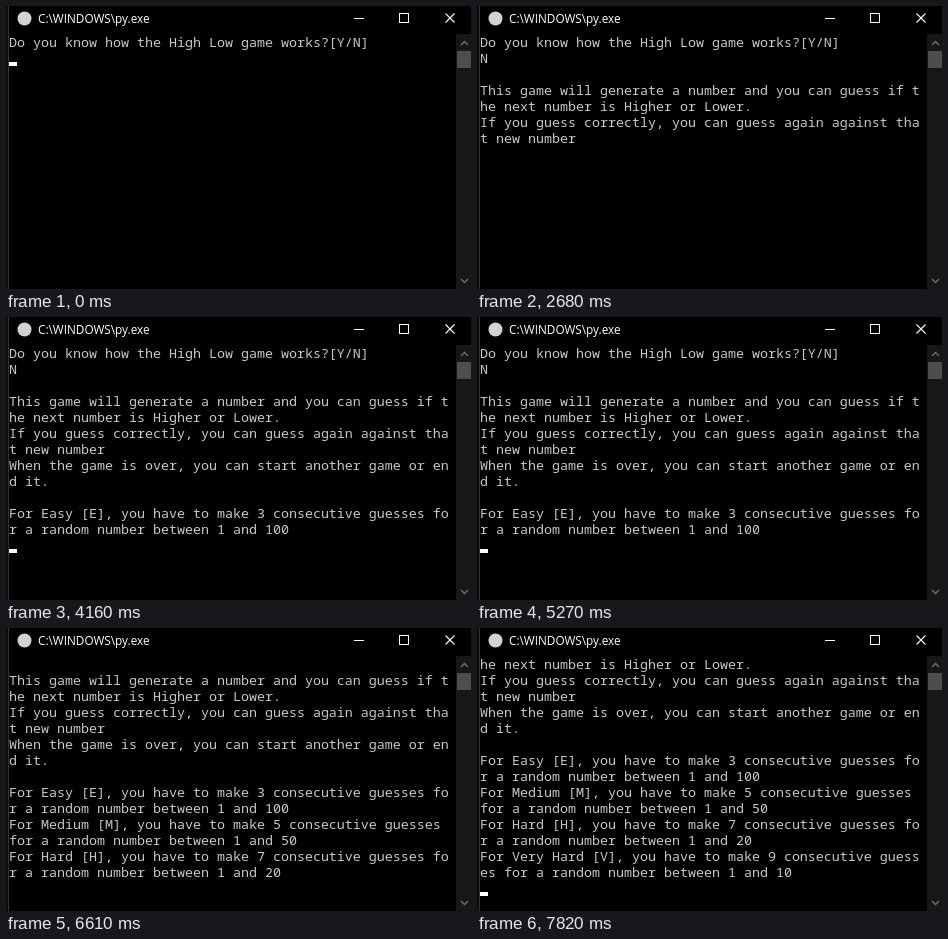
Recreate the animation shown at these times as an HTML page with a canvas. Size 465 px wide and 283 px high, loop 8 s.

```html
<!DOCTYPE html>
<html lang="en">
<head>
<meta charset="utf-8">
<title>High Low</title>
<style>
  html, body { margin: 0; width: 100%; height: 100%; overflow: hidden; background: #000; }
  canvas { display: block; width: 465px; height: 283px; }
</style>
</head>
<body>
<canvas id="stage"></canvas>
<script>
const W = 465, H = 283, LOOP = 8000;
const COLS = 55, ROWS = 15, CELL_W = 8, CELL_H = 16, LEFT = 3, TOP = 28;

// Console output: [time printed, text]
const prints = [
  [0, 'Do you know how the High Low game works?[Y/N]'],
  [50, 'N'],
  [420, ''],
  [420, 'This game will generate a number and you can guess if the next number is Higher or Lower.'],
  [1660, 'If you guess correctly, you can guess again against that new number'],
  [2910, 'When the game is over, you can start another game or end it.'],
  [4120, ''],
  [4120, 'For Easy [E], you have to make 3 consecutive guesses for a random number between 1 and 100'],
  [5360, 'For Medium [M], you have to make 5 consecutive guesses for a random number between 1 and 50'],
  [6610, 'For Hard [H], you have to make 7 consecutive guesses for a random number between 1 and 20'],
  [7820, 'For Very Hard [V], you have to make 9 consecutive guesses for a random number between 1 and 10']
];

// The cursor starts visible and flips at each of these times
const blinks = [50, 420, 1110, 1620, 2680, 3700, 4120, 4160, 4760, 5270, 6340, 7400];

const canvas = document.getElementById('stage');
const ctx = canvas.getContext('2d');
const ratio = window.devicePixelRatio || 1;
canvas.width = Math.round(W * ratio);
canvas.height = Math.round(H * ratio);

function rect(x, y, w, h, color) {
  ctx.fillStyle = color;
  ctx.fillRect(x, y, w, h);
}

function polyline(points, color, width) {
  ctx.strokeStyle = color;
  ctx.lineWidth = width;
  ctx.beginPath();
  points.forEach(([x, y]) => ctx.lineTo(x, y));
  ctx.stroke();
}

function wrap(text) {
  const rows = [];
  for (let i = 0; i === 0 || i < text.length; i += COLS) rows.push(text.slice(i, i + COLS));
  return rows;
}

function drawTitleBar() {
  ctx.fillStyle = '#d2d2d2';
  ctx.beginPath();
  ctx.arc(18.5, 12.5, 7, 0, Math.PI * 2);
  ctx.fill();

  ctx.font = '11.75px "Open Sans", "Noto Sans", sans-serif';
  ctx.fillStyle = '#fff';
  ctx.fillText('C:\\WINDOWS\\py.exe', 32, 17);

  rect(348, 12, 10, 1, '#fff');
  ctx.strokeStyle = '#fff';
  ctx.lineWidth = 1;
  ctx.strokeRect(393.5, 7.5, 9, 9);
  polyline([[439.5, 7.5], [448.5, 16.5]], '#fff', 1.1);
  polyline([[448.5, 7.5], [439.5, 16.5]], '#fff', 1.1);
}

function drawScrollBar() {
  rect(450, TOP, 15, H - TOP, '#171717');
  rect(451, 45, 14, 17, '#4d4d4d');
  polyline([[455, 39], [458.5, 35.5], [462, 39]], '#6b6b6b', 1.5);
  polyline([[455, 273], [458.5, 276.5], [462, 273]], '#6b6b6b', 1.5);
}

function drawConsole(t) {
  const rows = prints.filter(([at]) => at <= t).flatMap(([, text]) => wrap(text));
  // The first answer is typed over the waiting cursor
  const scroll = Math.max(0, rows.length - ROWS + 1);

  ctx.font = '13.3333px "Noto Sans Mono", "DejaVu Sans Mono", monospace';
  ctx.fillStyle = '#c8c8c8';
  rows.slice(scroll).forEach((row, i) => ctx.fillText(row, LEFT, TOP + i * CELL_H + 13));

  const flips = blinks.filter(at => at <= t).length;
  if (flips % 2 === 0) {
    rect(LEFT, TOP + (rows.length - scroll) * CELL_H + 12, CELL_W, 4, '#fff');
  }
}

function draw(t) {
  ctx.setTransform(ratio, 0, 0, ratio, 0, 0);
  rect(0, 0, W, H, '#000');
  rect(0, 0, 2, H, '#0c0c0c');
  rect(2, 0, 1, H, '#333');
  drawTitleBar();
  drawScrollBar();
  drawConsole(t);
}

const start = performance.now();
function tick() {
  draw((performance.now() - start) % LOOP);
  requestAnimationFrame(tick);
}
tick();
</script>
</body>
</html>
```
